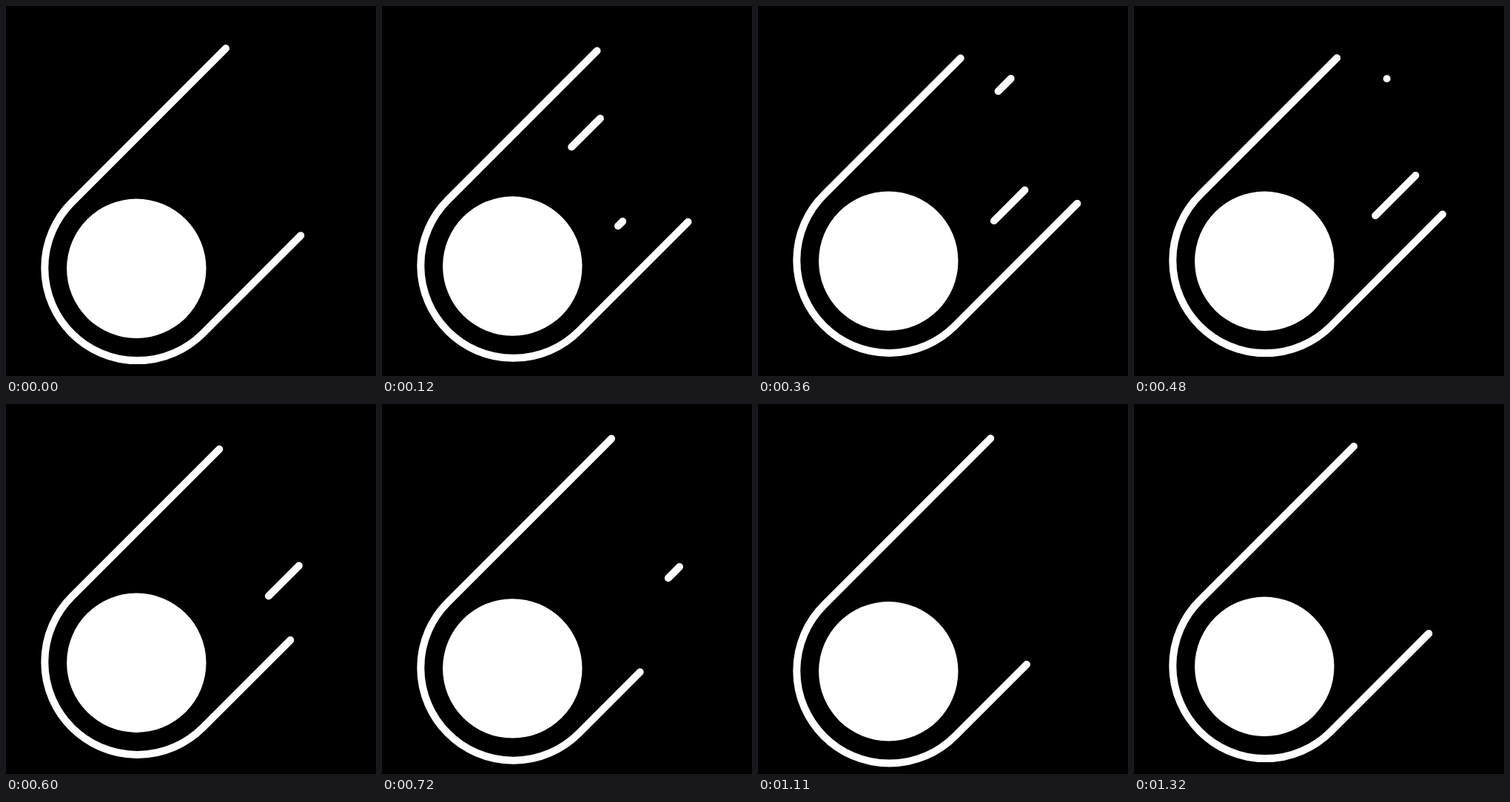
These frames come from a looping animation (500 by 500 pixels, 1.35 s). An HTML page:

```html
<!DOCTYPE html>
<html lang="en">
<head>
<meta charset="utf-8">
<title>Comet</title>
<style>
  html, body { margin: 0; width: 100%; height: 100%; overflow: hidden; background: #000; }
  svg { display: block; width: 100%; height: 100%; }
  path { fill: none; stroke: #fff; stroke-width: 10; stroke-linecap: round; }
</style>
</head>
<body>
<svg viewBox="0 0 500 500">
  <g id="comet">
    <circle cx="176.3" cy="354.8" r="94.2" fill="#fff"/>
    <path id="outline"/>
    <path id="dashA"/>
    <path id="dashB"/>
  </g>
</svg>
<script>
const LOOP = 1350, STEP = 30, CYCLE = LOOP - STEP;
const CX = 177.5, CY = 353.9, R = 125.2, D = R * Math.SQRT1_2;
const el = id => document.getElementById(id);

// Skewed sway: a sine wave plus its second harmonic
const sway = (mid, sin1, cos1, sin2, cos2) => t => {
  const a = t / CYCLE * 2 * Math.PI;
  return mid + sin1 * Math.sin(a) + cos1 * Math.cos(a)
    + sin2 * Math.sin(2 * a) + cos2 * Math.cos(2 * a);
};

const ease = (t, start, end) => {
  const p = Math.min(1, Math.max(0, (t - start) / (end - start)));
  return p * p * (3 - 2 * p);
};

const bob = sway(-0.3, -9.66, 0.67, 2.05, -0.38);
const upper = sway(299.3, -25.3, -1, 6.94, -1.3);
const lower = sway(383.85, 45.95, 16.4, -8.94, -1.95);

// A dash grows from x0 to x1 along x + y = sum, then its tail catches up
const dashes = [
  { node: el("dashA"), sum: 450, x0: 248, x1: 341.7, headEnd: 240, tailStart: 40, tailEnd: 480 },
  { node: el("dashB"), sum: 619.5, x0: 319, x1: 402, headEnd: 720, tailStart: 400, tailEnd: 840 }
];

function drawDash({ node, sum, x0, x1, headEnd, tailStart, tailEnd }, t) {
  const tail = x0 + (x1 - x0) * ease(t, tailStart, tailEnd);
  const head = x0 + (x1 - x0) * ease(t, 0, headEnd) + 0.01;
  node.style.display = t > 0 && t <= tailEnd ? "" : "none";
  node.setAttribute("d", `M${tail} ${sum - tail}L${head} ${sum - head}`);
}

function draw(t) {
  const u = upper(t), l = lower(t);
  el("comet").setAttribute("transform", `translate(0 ${bob(t)})`);
  el("outline").setAttribute("d",
    `M${u} ${CX + CY - 2 * D - u}L${CX - D} ${CY - D}` +
    `A${R} ${R} 0 0 0 ${CX + D} ${CY + D}L${l} ${CX + CY + 2 * D - l}`);
  dashes.forEach(dash => drawDash(dash, t));
}

function tick() {
  const t = performance.now() % LOOP;
  draw(Math.floor(t / STEP) * STEP);
  requestAnimationFrame(tick);
}
tick();
</script>
</body>
</html>
```
